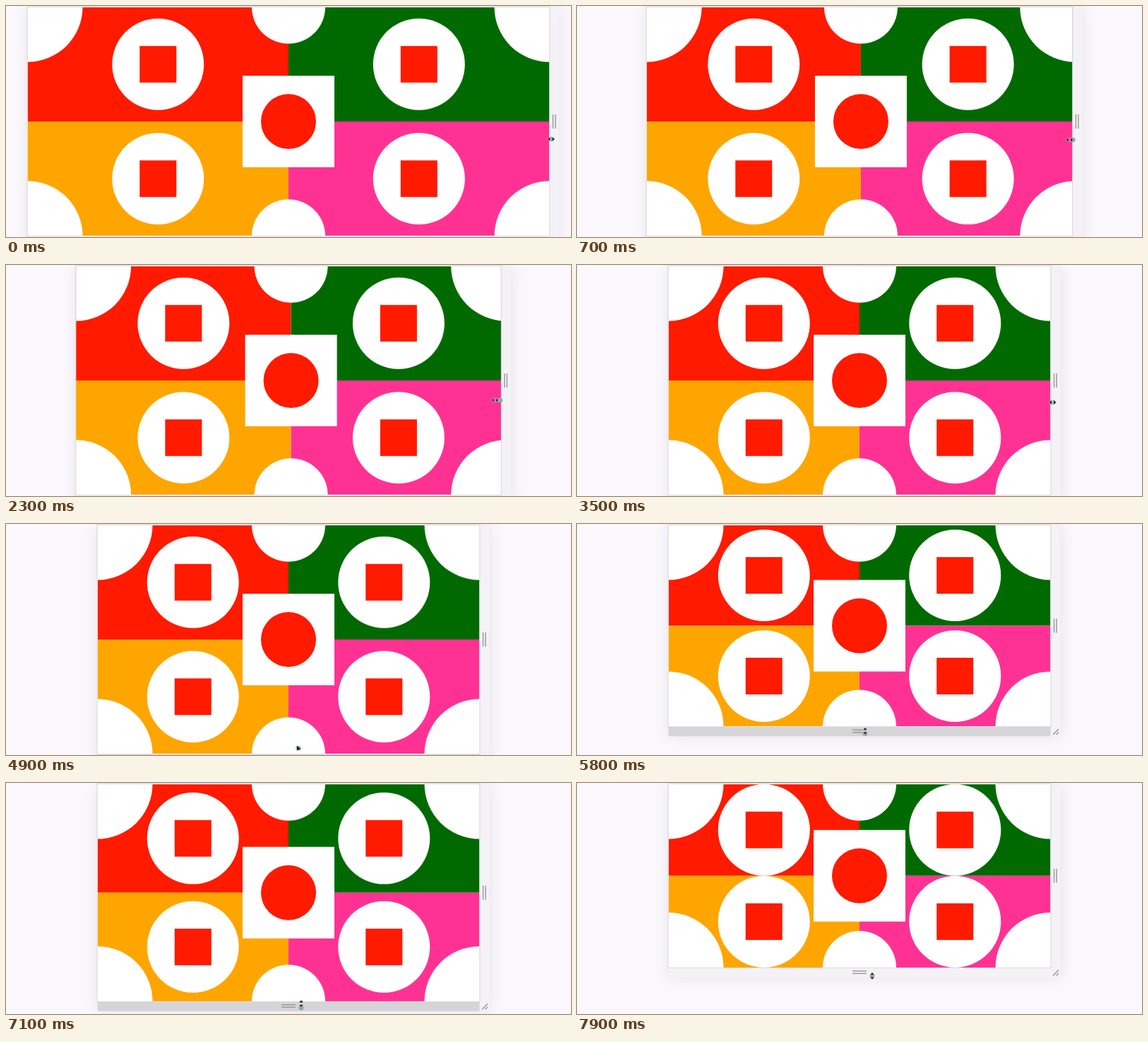
These frames come from a looping animation (800 by 328 pixels, 8000 ms). An HTML page with a canvas:

```html
<!DOCTYPE html>
<html>
<head>
<meta charset="utf-8">
<style>
html, body { margin: 0; width: 100%; height: 100%; overflow: hidden; background: #faf8fc; }
canvas { display: block; }
</style>
</head>
<body>
<canvas width="800" height="328"></canvas>
<script>
const g = document.querySelector('canvas').getContext('2d');
const LOOP = 8000, TOP = 1.5, CX = 400;
const RED = '#ff1a00', BAR = '#f4f2f7', GRIP = '#969696';

// [time, value] stops, eased with a cosine in between
const WIDTH = [[0, 739], [1130, 540], [1800, 810], [2520, 546], [2850, 541]];
const BOTTOM = [[5250, 326.5], [6220, 262], [6900, 326.5], [7494, 262]];
const MOUSE_X = [[3600, 674], [4500, 470], [5000, 408], [5800, 408], [6800, 418]];
const MOUSE_Y = [[3600, 195], [4500, 246], [5000, 326]];
const DRAG_Y = [[0, 189], [1400, 191], [2300, 192], [3500, 195]];

function at(stops, t) {
  if (t <= stops[0][0]) return stops[0][1];
  for (let i = 1; i < stops.length; i++) {
    const [t0, a] = stops[i - 1], [t1, b] = stops[i];
    if (t < t1) return a + (b - a) * (1 - Math.cos(Math.PI * (t - t0) / (t1 - t0))) / 2;
  }
  return stops[stops.length - 1][1];
}

function rect(x, y, w, h, color) {
  g.fillStyle = color;
  g.fillRect(x, y, w, h);
}

function square(x, y, size, color) {
  rect(x - size / 2, y - size / 2, size, size, color);
}

function disc(x, y, r, color) {
  g.fillStyle = color;
  g.beginPath();
  g.arc(x, y, r, 0, 2 * Math.PI);
  g.fill();
}

function line(x0, y0, x1, y1) {
  g.strokeStyle = GRIP;
  g.lineWidth = 1.4;
  g.beginPath();
  g.moveTo(x0, y0);
  g.lineTo(x1, y1);
  g.stroke();
}

function pattern(x, y, w, h) {
  const mx = x + w / 2, my = y + h / 2;
  rect(x, y, w / 2, h / 2, RED);
  rect(mx, y, w / 2, h / 2, '#006a00');
  rect(x, my, w / 2, h / 2, '#ffa500');
  rect(mx, my, w / 2, h / 2, '#ff3294');
  for (const cy of [y, y + h]) {
    disc(x, cy, 78, '#fff');
    disc(x + w, cy, 78, '#fff');
    disc(mx, cy, 52, '#fff');
  }
  for (const fx of [.25, .75]) for (const fy of [.25, .75]) {
    disc(x + w * fx, y + h * fy, 65, '#fff');
    square(x + w * fx, y + h * fy, 52, RED);
  }
  square(mx, my, 130, '#fff');
  disc(mx, my, 39, RED);
}

function pointer(x, y, shape) {
  g.save();
  g.translate(x, y);
  if (shape === 'vertical') g.rotate(Math.PI / 2);
  g.beginPath();
  if (shape === 'arrow') {
    g.moveTo(-2, -4); g.lineTo(4, 1); g.lineTo(-2, 3);
    g.closePath();
  } else {
    for (const s of [-1, 1]) {
      g.moveTo(s * 5, 0); g.lineTo(s * 1.5, -3); g.lineTo(s * 1.5, 3);
      g.closePath();
    }
  }
  g.strokeStyle = '#fff';
  g.lineWidth = 1;
  g.stroke();
  g.fillStyle = '#222';
  g.fill();
  g.restore();
}

function mouse(t, lead) {
  if (t < 3600) return [CX + at(WIDTH, t + lead) / 2 + 3, at(DRAG_Y, t)];
  const y = t < 5000 ? at(MOUSE_Y, t) : at(BOTTOM, t + lead) + 12;
  return [at(MOUSE_X, t), y];
}

function draw(t) {
  const w = at(WIDTH, t), left = CX - w / 2, right = CX + w / 2;
  const bottom = at(BOTTOM, t), h = bottom - TOP, mid = TOP + h / 2;
  rect(0, 0, 800, 328, '#faf8fc');

  // panel with its shadow and resize bars
  g.save();
  g.shadowColor = 'rgba(0,0,0,.09)';
  g.shadowBlur = 20;
  rect(left, TOP, w + 14, h + 14, BAR);
  g.restore();
  rect(left, bottom, w, 14, t > 4900 && t < 7600 ? '#d5d4d6' : BAR);
  rect(left, TOP, w, h, '#fff');

  // the pattern follows the panel with a slight delay
  g.save();
  g.beginPath();
  g.rect(left, TOP, w, h);
  g.clip();
  const pw = at(WIDTH, t - 15);
  g.beginPath();
  g.rect(left, TOP, pw, h);
  g.clip();
  pattern(left, TOP, pw, h);
  g.restore();
  g.strokeStyle = '#dddce0';
  g.lineWidth = 1;
  g.strokeRect(left - .5, TOP - .5, w + 1, h + 1);

  for (const d of [5, 8.5]) {
    line(right + d, mid - 10, right + d, mid + 10);
    line(CX - 10, bottom + d, CX + 10, bottom + d);
  }
  line(right + 3.5, bottom + 11.5, right + 11.5, bottom + 3.5);
  line(right + 8, bottom + 11.5, right + 11.5, bottom + 8);

  disc(...mouse(t, 18), 3.5, '#7fb0a8');
  pointer(...mouse(t, 55), t < 3600 ? 'horizontal' : t < 5000 ? 'arrow' : 'vertical');
}

const start = performance.now();
function tick() {
  draw((performance.now() - start) % LOOP);
  requestAnimationFrame(tick);
}
tick();
</script>
</body>
</html>
```
